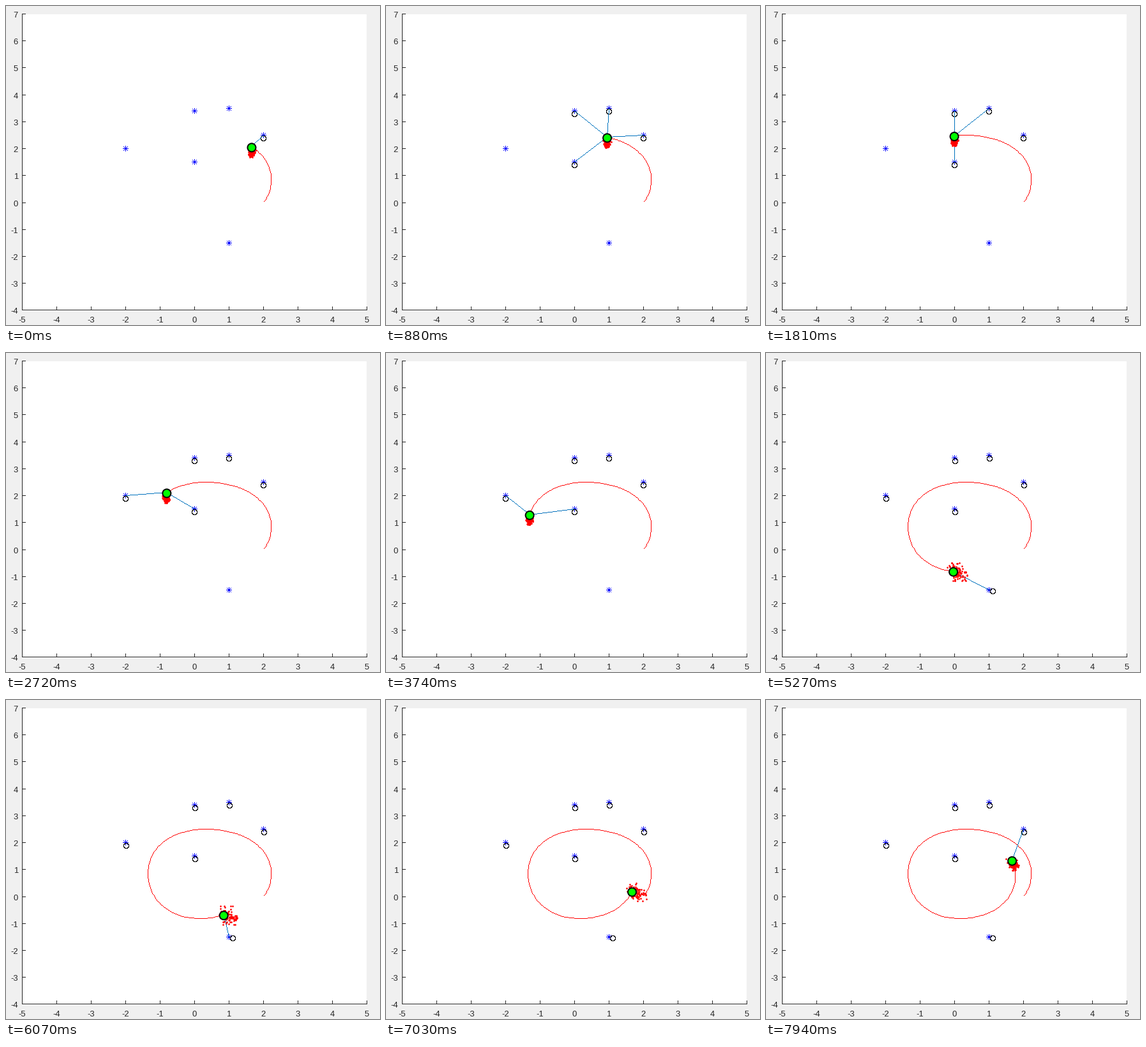
Recreate the animation shown at these times as a matplotlib script. Size 586 px wide and 500 px high, loop 8 s.

```python
import numpy as np
import matplotlib.pyplot as plt
from matplotlib.animation import FuncAnimation
from matplotlib.patches import Circle, Rectangle

W, H, DPI = 586, 500, 100
PX = 72 / DPI                      # one pixel in points
LOOP, TICK = 8000, 50
INK, TEAL = "#262626", "#0072bd"
RANGE = 1.5                        # sensor reach in plot units
SCALE = np.array([54, -42.24])
ORIGIN = np.array([295, 308.6])

LANDMARKS = np.array([(2, 2.5), (1, 3.5), (0, 3.4), (0, 1.5), (-2, 2), (1, -1.5)])
STARS = np.rint(ORIGIN + LANDMARKS * SCALE)

# The drive spirals in: one rounded quarter turn between each two extremes
EXTREMES = np.array([(303, 347), (415.3, 273), (312, 203), (222, 272),
                     (303, 343), (390.5, 275), (310, 215)])
START = .71
TIMES = [0, 1810, 3740, 4180, 5270, 6070, 7940]
TURNS = [1.51, 2.11, 2.85, 3.08, 3.93, 4.27, 5.25]


def position(turn):
    """Pixel position after a number of quarter turns."""
    turn = np.asarray(turn)
    q = np.minimum(turn.astype(int), len(EXTREMES) - 2)
    u = (turn - q) * np.pi / 2
    rise, fall = np.sin(u) ** .95, 1 - np.cos(u) ** .95
    (x0, y0), (x1, y1) = EXTREMES[q].T, EXTREMES[q + 1].T
    even = q % 2 == 0
    return np.column_stack([x0 + (x1 - x0) * np.where(even, rise, fall),
                            y0 + (y1 - y0) * np.where(even, fall, rise)])


clock = np.arange(0, LOOP, TICK) + .4 * TICK
turns = np.interp(clock, TIMES, TURNS)
robots = position(turns)
place = (robots - ORIGIN) / SCALE
visible = np.linalg.norm(place[:, None] - LANDMARKS, axis=2) < RANGE
known = np.logical_or.accumulate(visible, axis=0)
base = np.random.default_rng(4).normal(size=(90, 2))


def particles(k):
    """A tight tail behind the robot that loosens while little is seen."""
    loose = np.interp(clock[k], [4150, 5000, 7300, 8000], [0, 1, 1, .3])
    fresh = np.random.default_rng(100 + k).normal(size=base.shape)
    a, b = np.clip(.85 * base + .53 * fresh, -2, 2).T
    spread = 2.7 + 4.5 * loose
    x = 7 * loose + spread * (.9 * a * np.exp(-.25 * (1 - loose) * b) + .4 * loose * b)
    y = 10 - 9.5 * loose + spread * b
    return robots[k] + np.column_stack([x, y])


def estimates(k):
    guess = STARS + (clock[k] / LOOP, 5)
    guess[-1] = STARS[-1] + (6, 2.5)
    return guess[known[k]]


def stroke(points):
    """Pixels of a one-pixel line through the points."""
    points = np.rint(points)
    parts = [points[:1]]
    for a, b in zip(points[:-1], points[1:]):
        n = int(np.abs(b - a).max()) + 1
        parts.append(np.rint(np.linspace(a, b, n)))
    return np.vstack(parts)


def stamp(shape, centers):
    """Pixels of a small shape repeated at each center."""
    return (np.rint(centers)[:, None] + shape).reshape(-1, 2)


arm, diag = np.arange(-4, 5), np.arange(-3, 4)
STAR = np.vstack([np.column_stack(p) for p in (
    (arm, 0 * arm), (0 * arm, arm), (diag, diag), (diag, -diag))])
angle = np.linspace(0, 2 * np.pi, 65)
RING = np.unique(np.rint(4 * np.column_stack([np.cos(angle), np.sin(angle)])), axis=0)

fig = plt.figure(figsize=(W / DPI, H / DPI), dpi=DPI, facecolor="#f0f0f0")
ax = fig.add_axes([0, 0, 1, 1])
ax.set_xlim(0, W)
ax.set_ylim(H, 0)
ax.axis("off")


def ink(color, z, pixels=np.empty((0, 2))):
    return ax.plot(*pixels.T, ",", color=color, zorder=z)[0]


def label(x, y, value, align):
    ax.text(x, y, str(value), ha=align, va="baseline", color=INK,
            family="Liberation Sans", fontsize=13 * PX)


# Plot area, axis lines, ticks and labels
ax.add_patch(Rectangle((25, 13), 540, 465, fc="white", lw=0, zorder=0))
frame = [stroke([(25, 13), (25, 477), (564, 477)])]
for v in range(-5, 6):
    x = 295 + 54 * v
    frame.append(stroke([(x, 472), (x, 477)]))
    label(x, 496.5, v, "center")
for v in range(-4, 8):
    y = min(round(308.6 - 42.24 * v), 477)
    frame.append(stroke([(25, y), (30, y)]))
    label(19, y + 5, v, "right")
ink(INK, 1, np.vstack(frame))
ink("#0000ff", 3, stamp(STAR, STARS))

trail = ink("red", 2)
circles = ink("black", 4)
rays = ink(TEAL, 5)
dots, = ax.plot([], [], "o", ms=2.7 * PX, color="red", mew=0, zorder=6)
robot = ax.add_patch(Circle((0, 0), 6.5, fc="#00ff00", ec="black",
                            lw=2 * PX, zorder=7))


def draw(k):
    here = robots[k]
    path = position(np.append(np.arange(START, turns[k], .03), turns[k]))
    trail.set_data(*stroke(path).T)
    circles.set_data(*stamp(RING, estimates(k)).T)
    lines = [stroke([here, star]) for star in STARS[visible[k]]]
    rays.set_data(*np.vstack([np.empty((0, 2))] + lines).T)
    dots.set_data(*particles(k).T)
    robot.center = here + .5
    return trail, circles, rays, dots, robot


anim = FuncAnimation(fig, draw, frames=LOOP // TICK, interval=TICK,
                     repeat=True, repeat_delay=0, blit=False)
plt.show()
```
